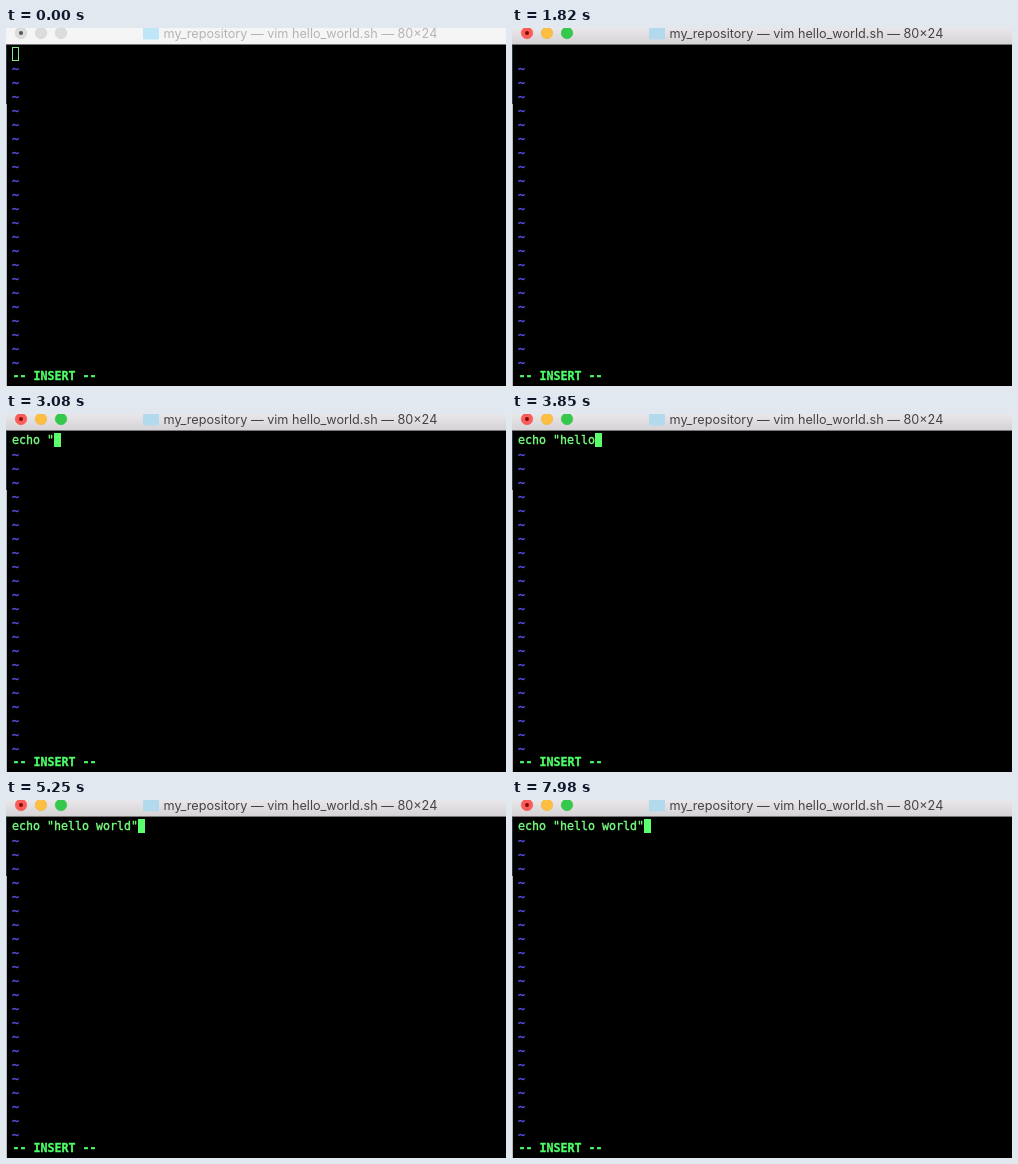
These frames come from a looping animation (500 by 358 pixels, 8.19 s). An HTML page:

```html
<!DOCTYPE html>
<html lang="en">
<head>
<meta charset="utf-8">
<title>Terminal typing</title>
<style>
  html, body { margin: 0; width: 100%; height: 100%; overflow: hidden; background: #000; }
  svg { display: block; width: 500px; height: 358px; }
  .mono { font: 11.63px "DejaVu Sans Mono", monospace; white-space: pre; stroke-width: .35; }
  .line { fill: #78ff80; stroke: #78ff80; }
  .tilde { fill: #5a55ee; stroke: #5a55ee; }
  .mode { fill: #4cff66; stroke: #4cff66; font-weight: bold; }
  .title { font: 12.66px Inter, sans-serif; fill: #454345; text-anchor: middle; }
  .folder { fill: #b3d9ec; }
  .dot { fill: #7e0d0a; }
  .inactive .title { fill: #b5b3b6; }
  .inactive .folder { fill: #bfe6f6; }
  .inactive .bar { fill: #f6f5f6; }
  .inactive .light { fill: #dddcdd; stroke: #d2d1d2; }
  .inactive .dot { fill: #555; }
</style>
</head>
<body>
<svg id="stage" viewBox="0 0 500 358">
  <defs>
    <linearGradient id="chrome" x2="0" y2="1">
      <stop stop-color="#e9e7e9"/>
      <stop offset="1" stop-color="#d5d3d5"/>
    </linearGradient>
  </defs>
  <rect width="500" height="358"/>
  <rect y="17" width="1" height="59" fill="#203840"/>
  <rect y="76" width="1" height="282" fill="#bbb"/>
  <rect class="bar" width="500" height="16" fill="url(#chrome)"/>
  <rect y="16" width="500" height="1" fill="#777"/>
  <circle class="light" cx="15" cy="5" r="5.7" fill="#fc5b57" stroke="#ee514b" stroke-width=".6"/>
  <circle class="dot" cx="15" cy="5" r="2"/>
  <circle class="light" cx="35" cy="5" r="5.7" fill="#fdbe41" stroke="#eeb038" stroke-width=".6"/>
  <circle class="light" cx="55" cy="5" r="5.7" fill="#35c94b" stroke="#2fba42" stroke-width=".6"/>
  <path class="folder" d="M137 0H153V10.5Q153 11.5 152 11.5H138Q137 11.5 137 10.5Z"/>
  <text class="title" x="294.4" y="10">my_repository — vim hello_world.sh — 80×24</text>
  <g id="tildes"></g>
  <text class="mono mode" x="6.6" y="352">-- INSERT --</text>
  <text id="line" class="mono line" x="6" y="30"></text>
  <rect id="cursor" y="19" width="7" height="14"/>
</svg>
<script>
const LOOP = 8190, FOCUS = 1820;
const CELL = 7, ROW = 14, LEFT = 6, TOP = 19;
const COMMAND = 'echo "hello world"';
const keyTimes = [
  2240, 2380, 2660, 2800, 2940, 3080,
  3220, 3360, 3500, 3570, 3710,
  4200, 4340, 4480, 4620, 4760, 4900, 5110
];
const cursorOff = [[FOCUS, 2100], [6160, 6720], [7210, 7770]];

const [stage, tildes, line, cursor] =
  ['stage', 'tildes', 'line', 'cursor'].map(id => document.getElementById(id));

for (let row = 1; row <= 22; row++) {
  tildes.innerHTML += `<text class="mono tilde" x="${LEFT}" y="${TOP + 12 + row * ROW}">~</text>`;
}

function setAttributes(node, values) {
  for (const name in values) node.setAttribute(name, values[name]);
}

function draw(time) {
  const focused = time >= FOCUS;
  const typed = keyTimes.filter(key => key <= time).length;
  const hidden = cursorOff.some(([from, to]) => time >= from && time < to);
  stage.classList.toggle('inactive', !focused);
  line.textContent = COMMAND.slice(0, typed);

  // An unfocused window shows a hollow cursor.
  const inset = focused ? 0 : 0.5;
  setAttributes(cursor, {
    x: LEFT + typed * CELL + inset,
    y: TOP + inset,
    width: CELL - 2 * inset,
    height: ROW - 2 * inset,
    fill: focused ? '#5cff6c' : 'none',
    stroke: focused ? 'none' : '#84e88a',
    visibility: hidden ? 'hidden' : 'visible'
  });
}

const start = performance.now();
function tick() {
  draw((performance.now() - start) % LOOP);
  requestAnimationFrame(tick);
}
tick();
</script>
</body>
</html>
```
